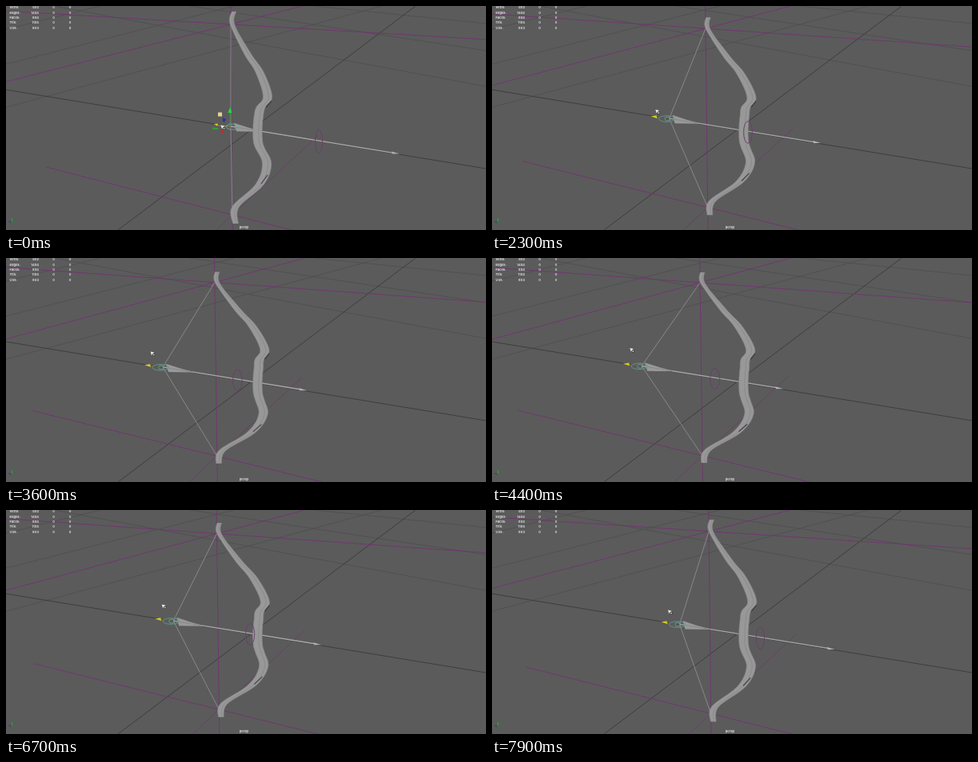
These frames come from a looping animation (600 px wide and 281 px high, 8000 ms). An HTML page with a canvas:

```html
<!DOCTYPE html>
<html lang="en">
<head>
<meta charset="utf-8">
<title>Bow rig</title>
<style>
html, body { margin: 0; width: 100%; height: 100%; overflow: hidden; background: #5b5b5b; }
canvas, svg { position: absolute; left: 0; top: 0; display: block; }
text { font: bold 4px Inter, Arial, sans-serif; fill: #dedede; }
</style>
</head>
<body>
<canvas id="view" width="600" height="281"></canvas>
<svg id="hud" width="600" height="281" viewBox="0 0 600 281"></svg>
<script>
const ctx = document.getElementById('view').getContext('2d');
const hud = document.getElementById('hud');
const LOOP = 8000, STEP = 100;
const GRIP = 157;

// Centre line of the relaxed bow, from top to bottom.
const SPINE = [[285, 7], [283, 23], [302, 60], [317, 83], [327, 114], [317, 131],
  [315, 170], [326, 197], [317, 224], [287, 252], [287, 273]];

function label(s, x, y, anchor = 'start') {
  const el = document.createElementNS('http://www.w3.org/2000/svg', 'text');
  el.setAttribute('x', x);
  el.setAttribute('y', y);
  el.setAttribute('text-anchor', anchor);
  el.textContent = s;
  hud.append(el);
}

Object.entries({ Verts: 602, Edges: 1494, Faces: 894, Tris: 1196, UVs: 803 })
  .forEach(([name, n], i) => {
    const y = 3.4 + i * 6.3;
    label(name + ':', 4.5, y);
    label(n, 41, y, 'end');
    label(0, 61, y, 'end');
    label(0, 81.5, y, 'end');
  });
label('persp', 297.5, 278.5, 'middle');

function line(x1, y1, x2, y2, color, w = .9) {
  ctx.strokeStyle = color;
  ctx.lineWidth = w;
  ctx.beginPath();
  ctx.moveTo(x1, y1);
  ctx.lineTo(x2, y2);
  ctx.stroke();
}

// Line through a and b, drawn from x1 to x2.
function ray(a, b, x1, x2, color) {
  const k = (b[1] - a[1]) / (b[0] - a[0]);
  line(x1, a[1] + (x1 - a[0]) * k, x2, a[1] + (x2 - a[0]) * k, color);
}

function poly(points, color) {
  ctx.fillStyle = color;
  ctx.beginPath();
  points.forEach(p => ctx.lineTo(...p));
  ctx.closePath();
  ctx.fill();
}

function path(points, color, w) {
  ctx.strokeStyle = color;
  ctx.lineWidth = w;
  ctx.beginPath();
  points.forEach(p => ctx.lineTo(...p));
  ctx.stroke();
}

function ring(x, y, rx, ry, color) {
  ctx.strokeStyle = color;
  ctx.lineWidth = .9;
  ctx.beginPath();
  ctx.ellipse(x, y, rx, ry, 0, 0, 7);
  ctx.stroke();
}

// Catmull-Rom curve through a few points.
function spline(pts, steps = 10) {
  const at = i => pts[Math.max(0, Math.min(pts.length - 1, i))];
  const out = [];
  for (let n = 0; n <= (pts.length - 1) * steps; n++) {
    const i = Math.floor(n / steps), f = n / steps - i;
    const [a, b, c, d] = [at(i - 1), at(i), at(i + 1), at(i + 2)];
    out.push([0, 1].map(k => b[k] + f / 2 * (c[k] - a[k]
      + f * (2 * a[k] - 5 * b[k] + 4 * c[k] - d[k]
      + f * (3 * (b[k] - c[k]) + d[k] - a[k])))));
  }
  return out;
}

const LIMBS = spline(SPINE);

function bend([x, y], q) {
  const up = y < GRIP;
  const u = Math.max(0, Math.abs(y - GRIP) - 20) / (up ? 130 : 96);
  return [x - 22 * q * u, y + (up ? 11 : -16) * q * u ** 1.5];
}

// Ease out to full draw, hold, then let down evenly.
function pull(t) {
  const f = Math.max(0, Math.min(1, (t - 200) / 5000));
  return t < 5500 ? Math.sin(f * Math.PI / 2) : 1 - .52 * (t - 5500) / 2400;
}

function grid() {
  const soft = '#505050', dark = '#3a3a3a';
  line(0, 127, 470, 0, soft);
  line(0, 73, 285, 0, soft);
  line(0, 29, 118, 0, soft);
  line(60, 0, 600, 101, soft);
  line(230, 0, 600, 56, soft);
  line(385, 0, 600, 22, soft);
  line(0, 105, 600, 204, dark);
  line(140, 281, 512, 0, dark);
}

function guides(q, top, low) {
  const c = '#723472', faint = '#693f69';
  const left = 32 + 18 * (1 - q);
  ray([0, 95 + 7 * q], top, 0, 400, c);
  ray([600, 42 + 14 * q], top, 0, 600, c);
  ray([left, 202 - 11 * q], low, left, 420, c);
  ray(low, [low[0] + 100, low[1] - 93], 200, low[0] + 107, faint);
  const k = (low[0] - top[0]) / (low[1] - top[1]);
  line(top[0] - top[1] * k, 0, low[0] + (281 - low[1]) * k, 281, c);
}

function bow(q) {
  const side = s => LIMBS.map(([x, y]) => {
    const reach = Math.min(1, Math.abs(y - GRIP) / 125);
    return bend([x + s * (5.7 - 3 * reach ** 3), y], q);
  });
  const left = side(-1), right = side(1);
  poly([...left, ...[...right].reverse()], '#989898');
  path(left, '#8a8a8a', .7);
  path(right, '#848484', .7);
  path(side(.25), '#878787', .8);
  line(...bend([332, 119], q), ...bend([325, 127], q), '#3c3c3c', 1.2);
  line(...bend([327, 212], q), ...bend([319, 223], q), '#424242', 1.2);
}

function arrow(nx, ny, tx, ty) {
  const k = (ty - ny) / (tx - nx);
  const on = (d, off) => [nx + d, ny + d * k + off];
  line(nx, ny, ...on(tx - nx - 6, 0), '#a8a8a8', 1.3);
  poly([on(4, -5), on(22, -2), on(40, 0), on(24, 2.5), on(7, 5)], '#999999');
  line(...on(6, 0), ...on(38, 0), '#858585', .8);
  poly([[tx - 10, ty - 3], [tx, ty], [tx - 9, ty]], '#b4b4b4');
}

function idleGizmo() {
  line(280, 151, 280, 134, '#3c8f45');
  poly([[280, 127], [282.5, 134], [277.5, 134]], '#18e235');
  ctx.fillStyle = '#e5d391';
  ctx.fillRect(265, 133.5, 5, 5);
  poly([[271, 140], [275, 142], [273, 146], [271, 145]], '#28369f');
  poly([[260, 148], [265, 147.5], [264, 150.5]], '#e3d51c');
  line(264, 149.5, 280, 151, '#a9a047');
  line(258, 153.5, 265, 154, '#29a832', 2);
  poly([[268, 157], [271, 155.5], [273, 158], [270, 159.5]], '#df2020');
  ring(283, 151.5, 8, 3.5, '#70a6a3');
}

function dragGizmo(x, y) {
  line(x - 17, y - 2, x, y, '#6d6c45');
  ring(x - 3, y + .3, 10, 3.8, '#5b9a93');
  ring(x - 2, y + .3, 3.5, 2.5, '#6c9c9c');
  poly([[x - 23, y - 2.7], [x - 16, y - 4], [x - 15, y - .2]], '#d6cd1f');
}

function cursor(x, y) {
  poly([[x - 2.5, y - 2.5], [x + 2, y - 1.5], [x - 1, y + 2]], '#eeeeee');
  ctx.fillStyle = '#333333';
  ctx.fillRect(x, y, 3, 3);
  ctx.fillStyle = '#e4e4e4';
  ctx.fillRect(x + .7, y + .7, 1.6, 1.6);
}

function draw(t) {
  const p = pull(t), q = p * p * (3 - 2 * p);
  const nx = 281 - 97 * p, ny = 151 - 16 * p;
  const top = [281 - 21 * q, 23 + 8 * q], low = [283 - 20 * q, 262 - 14 * q];
  const idle = t < 300, drawing = t < 5500;

  ctx.fillStyle = '#5b5b5b';
  ctx.fillRect(0, 0, 600, 281);
  grid();
  guides(q, top, low);
  line(...top, nx, ny, '#949494', .8);
  line(nx, ny, ...low, '#949494', .8);
  arrow(nx, ny, 492 - 132 * p, 185.5 - 22 * p);
  bow(q);
  ring(391 - 116 * p, 170 - 19 * p, 4.5 + 1.5 * p, 15 - 2 * p, '#6d3d6d');
  if (idle) idleGizmo(); else dragGizmo(nx, ny);
  const cx = idle ? 271 : nx - 12 - (drawing ? 7 * (1 - p) : 0);
  const cy = Math.min(152, 114 + (drawing ? 48 : 27) * (1 - p));
  cursor(cx, cy);

  line(7.5, 272, 7.5, 266, '#2ba53b', 1.1);
  line(7.5, 271.5, 3, 270, '#2b3d92');
  line(7.5, 271.5, 4, 273, '#316a43');
}

function tick(now) {
  draw(Math.floor(now % LOOP / STEP) * STEP);
  requestAnimationFrame(tick);
}
draw(0);
requestAnimationFrame(tick);
</script>
</body>
</html>
```
